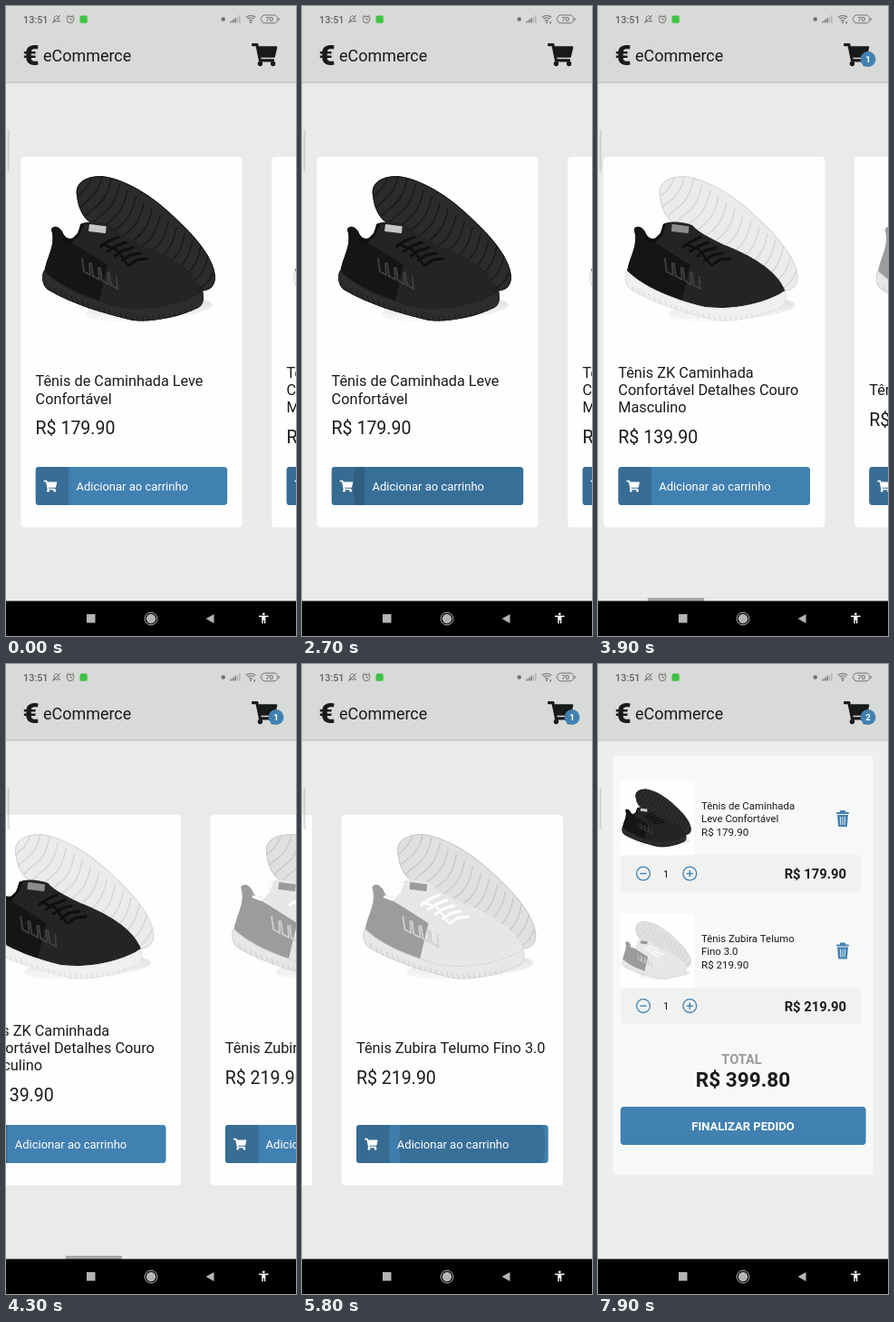
These frames come from a looping animation (320 by 693 pixels, 8000 ms). An HTML page with a canvas:

```html
<!DOCTYPE html>
<html lang="pt-BR">
<head>
<meta charset="utf-8">
<title>eCommerce</title>
<style>
html, body { margin: 0; width: 100%; height: 100%; overflow: hidden; background: #e9ebea; }
canvas { display: block; width: 100vw; height: 100vh; }
</style>
</head>
<body>
<canvas id="stage"></canvas>
<script>
const W = 320, H = 693, NAV_TOP = 654.4, LOOP = 8000;
const BLUE = '#4181b1', DARK_BLUE = '#386d95', INK = '#191b1a';
const GAP = 16.28, PITCH = 276.9;
const canvas = document.getElementById('stage');
const c = canvas.getContext('2d');

const CART = new Path2D('M528 301L575 93C579 78 567 64 552 64H159L150 19C148 8 138 0 127 0H24C11 0 0 11 0 24V40C0 53 11 64 24 64H94L164 407C147 417 136 435 136 456C136 487 161 512 192 512S248 487 248 456C248 440 242 426 231 416H441C430 426 424 440 424 456C424 487 449 512 480 512S536 487 536 456C536 434 523 415 504 406L510 381C513 366 502 352 487 352H218L212 320H505C516 320 526 312 528 301Z');
const NO_CART = new Path2D('M22.73 22.73L1.27 1.27 0 2.54l4.39 4.39 2.21 4.66-1.35 2.45c-.16.28-.25.61-.25.96 0 1.1.9 2 2 2h7.46l1.38 1.38c-.5.36-.83.95-.83 1.62 0 1.1.89 2 1.99 2 .67 0 1.26-.33 1.62-.84L21.46 24zM7.42 15c-.14 0-.25-.11-.25-.25l.03-.12.9-1.63h2.36l2 2zm8.13-2c.75 0 1.41-.41 1.75-1.03l3.58-6.49c.08-.14.12-.31.12-.48 0-.55-.45-1-1-1H6.54zM7 18c-1.1 0-1.99.9-1.99 2S5.9 22 7 22s2-.9 2-2-.9-2-2-2z');

const SHOE = {
  back: new Path2D('M78 208C76 194 88 187 106 187C136 191 168 213 194 240C214 259 230 280 231 298C231 314 216 317 200 310L90 236C82 228 79 218 78 208Z'),
  upper: new Path2D('M50 246C52 241 58 242 62 248C66 258 74 258 80 250L82 240C88 236 104 237 114 241C122 250 136 256 150 263C178 274 208 290 217 314C204 330 170 338 130 334C96 326 62 314 42 296C43 278 56 264 50 246Z'),
  heel: new Path2D('M50 246C52 241 58 242 62 248C65 257 72 260 82 266L112 285L102 328C80 320 58 312 42 296C43 278 56 264 50 246Z'),
  sole: new Path2D('M42 291C60 309 94 323 128 331C160 335 196 327 217 313C219 322 218 329 212 332C190 343 160 348 140 346C108 338 74 329 46 312C39 306 39 296 42 291Z')
};
const BLACK = { back: '#2a2b2c', groove: '#18191a', upper: '#202122', mesh: '#2d2e2f', heel: '#141516', sole: '#2c2d2e', edge: '#1b1c1d', lace: '#0e0f10', cage: '#3f4143', tag: '#c4c6c5' };
const DUO = { ...BLACK, back: '#eaebea', groove: '#d5d7d6', sole: '#eff0ef', edge: '#dcdedd', tag: '#8b8d8c' };
const LIGHT = { back: '#dfe0df', groove: '#c9cbca', upper: '#e9ebea', mesh: '#dcdedd', heel: '#9d9c9a', sole: '#e6e8e7', edge: '#cfd1d0', lace: '#fcfdfc', cage: '#cfd0cf', tag: '#9a9b9a' };

const PRODUCTS = [
  { lines: ['Tênis de Caminhada Leve', 'Confortável'], price: 'R$ 179.90', look: BLACK, press: { t: 2650, x: 125.5, r: 85, fade: 2900 }, added: 3100 },
  { lines: ['Tênis ZK Caminhada', 'Confortável Detalhes Couro', 'Masculino'], price: 'R$ 139.90', look: DUO },
  { lines: ['Tênis Zubira Telumo Fino 3.0'], price: 'R$ 219.90', look: LIGHT, press: { t: 5580, x: 127.5, r: 10, fade: 6000 }, added: 6200 }
];

const clamp = v => Math.max(0, Math.min(1, v));
const span = (t, a, b) => clamp((t - a) / (b - a));
const easeOut = k => 1 - (1 - k) ** 3;

function text(s, x, y, size, color = INK, weight = 400, align = 'left') {
  c.font = `${weight} ${size}px Roboto, sans-serif`;
  c.textAlign = align;
  c.fillStyle = color;
  c.fillText(s, x, y);
}
function rect(x, y, w, h, color, r = 0) {
  c.beginPath();
  c.roundRect(x, y, w, h, r);
  c.fillStyle = color;
  c.fill();
}
function disc(x, y, r, color) {
  c.beginPath();
  c.arc(x, y, r, 0, 7);
  c.fillStyle = color;
  c.fill();
}
function ring(x, y, r, color, width, a = 0, b = 7) {
  c.beginPath();
  c.arc(x, y, r, a, b);
  c.strokeStyle = color;
  c.lineWidth = width;
  c.stroke();
}
function line(points, color, width) {
  c.beginPath();
  points.forEach(([x, y]) => c.lineTo(x, y));
  c.strokeStyle = color;
  c.lineWidth = width;
  c.stroke();
}
function at(x, y, scale, draw) {
  c.save();
  c.translate(x, y);
  c.scale(scale, scale);
  draw();
  c.restore();
}
function icon(path, x, y, scale, color) {
  at(x, y, scale, () => { c.fillStyle = color; c.fill(path); });
}
function within(path, draw) {
  c.save();
  c.clip(path);
  draw();
  c.restore();
}

function shoe(p) {
  c.save();
  c.translate(-36.7, -166);
  c.lineCap = c.lineJoin = 'round';
  const glow = c.createLinearGradient(0, 322, 0, 352);
  glow.addColorStop(0, 'rgba(120,122,121,.22)');
  glow.addColorStop(1, 'rgba(120,122,121,0)');
  c.beginPath();
  c.ellipse(158, 334, 70, 12, -.08, 0, 7);
  c.fillStyle = glow;
  c.fill();

  c.fillStyle = p.back;
  c.fill(SHOE.back);
  within(SHOE.back, () => {
    c.strokeStyle = p.groove;
    c.lineWidth = 1.5;
    for (let i = 0; i < 17; i++) {
      const x = 82 + i * 9, y = 200 + i * 6.8;
      c.beginPath();
      c.moveTo(x - 18, y + 30);
      c.bezierCurveTo(x - 10, y + 2, x + 8, y + 16, x + 16, y - 24);
      c.stroke();
    }
    c.lineWidth = 2;
    c.stroke(SHOE.back);
  });

  c.fillStyle = p.upper;
  c.fill(SHOE.upper);
  within(SHOE.upper, () => {
    for (let i = 0; i < 46; i++) {
      const x = 70 + i * 4;
      line([[x, 235], [x - 55, 335]], p.mesh, .7);
      line([[x - 70, 235], [x + 30, 335]], p.mesh, .5);
    }
  });
  c.fillStyle = p.heel;
  c.fill(SHOE.heel);
  line([[64, 256], [72, 259], [80, 251], [84, 241]], p.lace, 3);
  at(92, 240, 1, () => { c.rotate(.12); rect(0, 0, 19, 8, p.tag, 1); });
  for (let i = 0; i < 5; i++) {
    const x = 104 + i * 8, y = 257 + i * 5;
    line([[x, y + 8], [x + 9, y + 2], [x + 20, y - 3 + i]], p.lace, 3);
  }
  line([[106, 262], [122, 268], [134, 284]], p.lace, 2.5);
  for (let i = 0; i < 4; i++) {
    const x = 84 + i * 10, y = 278 + i * 5;
    line([[x, y], [x + 2, y + 14], [x + 9, y + 18], [x + 8, y + 5]], p.cage, 1.8);
  }

  c.fillStyle = p.sole;
  c.fill(SHOE.sole);
  within(SHOE.sole, () => {
    for (let i = 0; i < 30; i++) {
      const x = 42 + i * 6, y = 308 + 36 * Math.sin(i / 29 * 2.4);
      line([[x, y - 3], [x + 3, y + 6]], p.edge, 1.2);
    }
    c.strokeStyle = p.edge;
    c.lineWidth = 1.5;
    c.stroke(SHOE.sole);
  });
  c.restore();
}

function addButton(product, t) {
  const added = t >= product.added;
  const dark = added ? 44 : 36.7;
  const shape = new Path2D();
  shape.roundRect(0, 0, 211.8, 41.9, 4);
  within(shape, () => {
    rect(0, 0, 212, 42, BLUE);
    rect(0, 0, dark, 42, DARK_BLUE);
    const p = product.press;
    if (p && t >= p.t && t < p.fade + 300) {
      const alpha = span(t, p.t, p.t + 50) * (1 - span(t, p.fade, p.fade + 300));
      rect(0, 0, 212, 42, `rgba(0,0,0,${alpha * .02})`);
      disc(p.x, 21, p.r + .32 * (t - p.t), `rgba(0,0,0,${alpha * .12})`);
    }
  });
  icon(CART, 9.1, 14.8, .0252, '#fff');
  if (added) text('1', 28.3, 26.2, 13, '#fff');
  text('Adicionar ao carrinho', dark + 8.2, 26.2, 13, '#fff');
}

function card(product, x, t) {
  if (x > W || x < -250) return;
  at(x, 0, 1, () => {
    rect(0, 166, 244.4, 407.5, '#fdfefd', 4);
    at(20.4, 166, 1, () => shoe(product.look));
    const n = product.lines.length;
    product.lines.forEach((s, i) => text(s, GAP, 428 + (i - (n - 1) / 2) * 19.1, 16.28));
    text(product.price, GAP, 452 + n * 9.55, 19.54);
    at(GAP, 507, 1, () => addButton(product, t));
  });
}

function header(t) {
  rect(0, 0, W, 83, '#d8dad8');
  const shade = c.createLinearGradient(0, 83, 0, 86);
  shade.addColorStop(0, 'rgba(0,0,0,.18)');
  shade.addColorStop(1, 'rgba(0,0,0,0)');
  rect(0, 83, W, 3, shade);
  text('€', 18.6, 64.6, 31.5, INK, 900);
  text('eCommerce', 41, 60.5, 17.95);
  icon(CART, 271, 41, .0492, INK);
  const count = PRODUCTS.filter(p => t >= p.added).length;
  if (count) {
    disc(298, 58.5, 8.4, BLUE);
    text(count, 298, 62, 9.8, '#fff', 700, 'center');
  }
}

// Two flicks: a steady drag, then a decelerating coast.
function scrollAt(t) {
  if (t < 3600) return 161.5 * span(t, 3380, 3600);
  if (t < 4240) return 161.5 + 138.5 * easeOut(span(t, 3600, 4150));
  if (t < 4300) return 300 + 44 * span(t, 4240, 4300);
  return 344 + 182.4 * easeOut(span(t, 4300, 5150));
}

function home(t) {
  rect(0, 0, W, 655, '#e9ebea');
  const scroll = scrollAt(t);
  PRODUCTS.forEach((p, i) => card(p, GAP + i * PITCH - scroll, t));
  const bar = span(t, 3380, 3420) * (1 - span(t, 5520, 5760));
  if (bar) rect(scroll * .191, 651, 62, 4, `rgba(120,122,121,${bar * .6})`);
  header(t);
}

function emptyCart() {
  rect(GAP, 101, 287.4, 210.5, '#f7f9f7', 4);
  icon(NO_CART, 139.6, 143.5, 1.7, '#a9abaa');
  text('Ops! Parece que seu carrinho', 160, 199.3, 14.65, INK, 700, 'center');
  text('está vazio', 160, 216.7, 14.65, INK, 700, 'center');
  rect(65.5, 237, 189, 34, BLUE, 4);
  text('Volte para a página inicial', 160, 259, 13, '#fff', 400, 'center');
}

function trash(x, y) {
  rect(x - 7, y - 7, 14, 2, BLUE, 1);
  rect(x - 3, y - 9, 6, 3, BLUE, 1);
  c.beginPath();
  c.moveTo(x - 6, y - 4);
  c.lineTo(x + 6, y - 4);
  c.lineTo(x + 4.8, y + 9);
  c.lineTo(x - 4.8, y + 9);
  c.fill();
  for (const d of [-2.6, 0, 2.6]) line([[x + d, y - 2], [x + d * .85, y + 7]], '#f7f9f7', .9);
}

function cartItem(product, lines, y) {
  at(0, y, 1, () => {
    rect(25, 210, 265.3, 40.5, '#f0f2f0', 4);
    rect(25, 129, 81.4, 81.4, '#fdfefd');
    at(25, 129, .4, () => shoe(product.look));
    lines.forEach((s, i) => text(s, 114, 160.3 + i * 13.6, 11.4));
    text(product.price, 114, 189.3, 11.6);
    trash(270, 170);
    for (const x of [50, 101.3]) {
      ring(x, 230.5, 7.4, BLUE, 1.3);
      line([[x - 3.6, 230.5], [x + 3.6, 230.5]], BLUE, 1.4);
    }
    line([[101.3, 226.9], [101.3, 234.1]], BLUE, 1.4);
    text('1', 75, 234.8, 11.8, INK, 400, 'center');
    text(product.price, 274, 236, 14.8, INK, 700, 'right');
  });
}

function fullCart() {
  rect(GAP, 101, 287.4, 460.5, '#f7f9f7', 4);
  cartItem(PRODUCTS[0], ['Tênis de Caminhada', 'Leve Confortável'], 0);
  cartItem(PRODUCTS[2], ['Tênis Zubira Telumo', 'Fino 3.0'], 145.6);
  text('TOTAL', 158.5, 440.3, 14.65, '#999b9a', 700, 'center');
  text('R$ 399.80', 160, 464.5, 22.6, INK, 700, 'center');
  rect(24.8, 487, 270.8, 42, BLUE, 4);
  text('FINALIZAR PEDIDO', 160, 512.7, 13, '#fff', 700, 'center');
}

function statusBar(t) {
  const g = '#717372';
  rect(0, 0, W, 24, '#d8dad8');
  text('13:51', 19, 18.5, 10.8, '#626463', 500);
  c.lineCap = 'butt';
  line([[52, 17], [53.2, 15.5], [53.2, 12.5], [55.5, 10.5], [58, 12.5], [58, 15.5], [59.5, 17], [52, 17]], g, 1);
  line([[51, 19], [60, 10]], g, 1);
  ring(71, 14.8, 3.8, g, 1);
  line([[71, 12.5], [71, 15], [73, 15]], g, .9);
  line([[66.5, 11.8], [68.5, 10]], g, 1);
  line([[73.5, 10], [75.5, 11.8]], g, 1);
  rect(81.5, 10.5, 8.2, 8.2, '#3fc243', 1.5);

  disc(239.7, 14.5, 2.3, g);
  for (let i = 0; i < 5; i++) {
    const h = 2 + i * 1.6;
    rect(247.5 + i * 2.4, 18.5 - h, 1.5, h, i < 3 ? g : '#b3b5b4');
  }
  for (const r of [2.6, 5.2, 7.8]) ring(270, 18.3, r, g, 1.2, -2.3, -.84);
  disc(270, 18, 1, g);
  if (t >= 2100 && t < 7100) rect(273.4, 17, 1.4, 2.6, g);
  c.beginPath();
  c.roundRect(281.5, 10, 18.5, 8.8, 4.2);
  c.strokeStyle = g;
  c.lineWidth = 1;
  c.stroke();
  rect(300.5, 13, 1, 3, g);
  text('70', 290.8, 17.2, 7.4, '#626463', 500, 'center');
}

function navBar() {
  rect(0, NAV_TOP, W, H - NAV_TOP, '#000');
  rect(89, 669, 9.5, 9.5, '#b4b4b4');
  ring(160, 674, 6.9, '#b4b4b4', 1);
  disc(160, 674, 5.2, '#b4b4b4');
  c.beginPath();
  c.moveTo(220.5, 674);
  c.lineTo(229.5, 669);
  c.lineTo(229.5, 679);
  c.fill();
  disc(284.3, 668.8, 1.4, '#fff');
  rect(279, 670.6, 10.6, 1.5, '#fff');
  rect(282.3, 671, 4, 4.5, '#fff');
  rect(282.3, 675, 1.4, 4.2, '#fff');
  rect(284.9, 675, 1.4, 4.2, '#fff');
}

// Critically damped spring, at rest once nearly settled.
function pushAt(t) {
  const x = Math.max(0, t - 7400) * .0212;
  return x > 6.2 ? 1 : 1 - Math.exp(-x) * (1 + x);
}

function draw(t) {
  const push = pushAt(t);
  if (push < 1) {
    at(-96 * push, 0, 1, () => home(t));
    if (push) rect(0, 0, W, 655, `rgba(0,0,0,${push * .075})`);
  }
  if (push) at(W * (1 - push), 0, 1, () => {
    if (push < 1) rect(-2, 0, 2, 655, 'rgba(0,0,0,.03)');
    rect(0, 0, W, 655, '#edefed');
    (t < 7750 ? emptyCart : fullCart)();
    header(t);
  });
  rect(1.5, 136.5, 2.5, 45.5, 'rgba(140,142,141,.25)', 1.2);
  statusBar(t);
  navBar();
}

function resize() {
  const d = devicePixelRatio || 1;
  canvas.width = Math.round(innerWidth * d);
  canvas.height = Math.round(innerHeight * d);
}
addEventListener('resize', resize);
resize();

const start = performance.now();
function tick() {
  c.setTransform(canvas.width / W, 0, 0, canvas.height / H, 0, 0);
  draw((performance.now() - start) % LOOP);
  requestAnimationFrame(tick);
}
tick();
</script>
</body>
</html>
```
